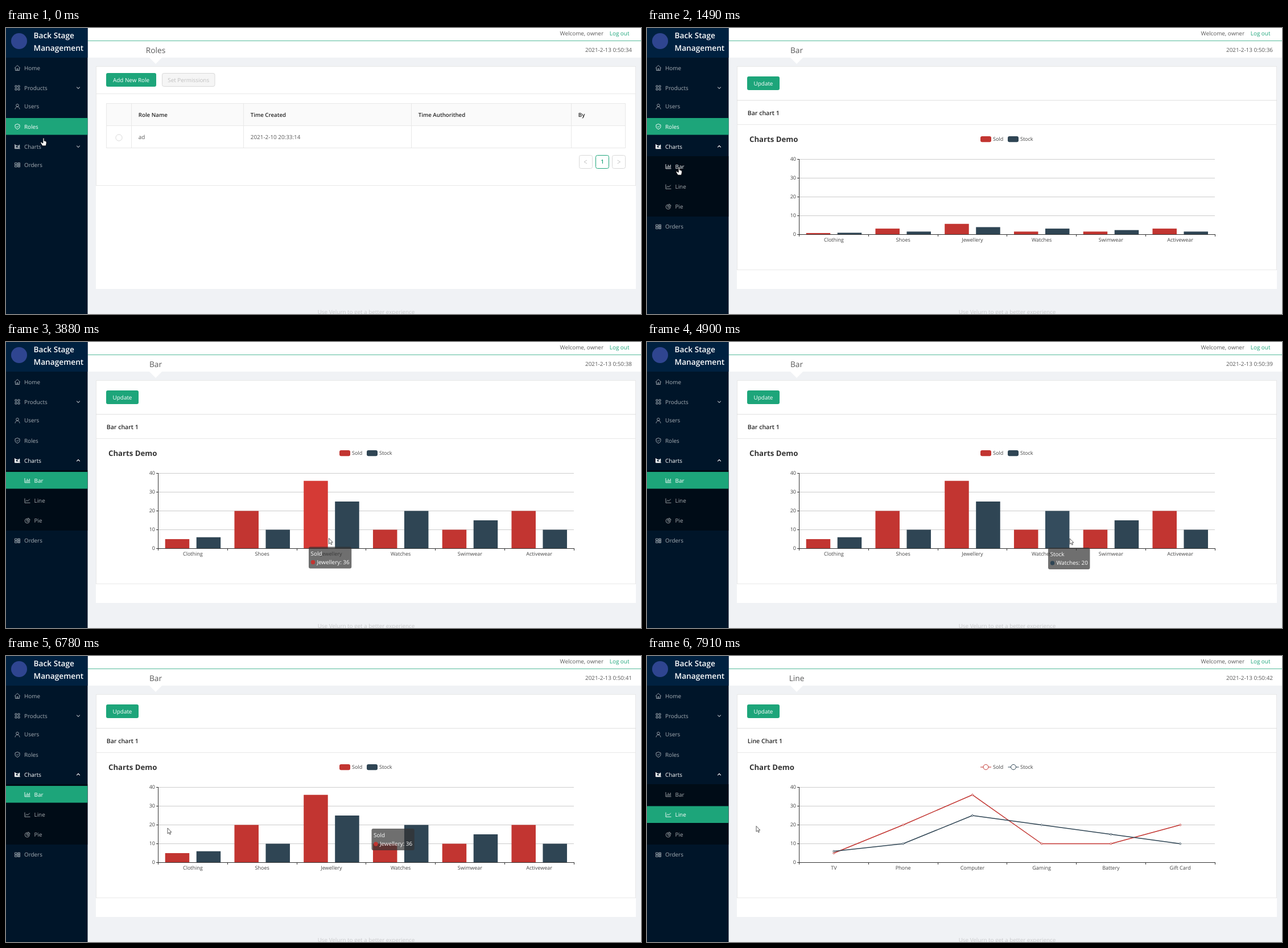
Animation of 1116x502 px, one loop 8 s. Source, as an HTML page:

```html
<!DOCTYPE html>
<html lang="en">
<head>
<meta charset="utf-8">
<title>Back Stage Management</title>
<style>
  html, body { margin: 0; width: 100%; height: 100%; overflow: hidden; background: #f0f2f5; }
  svg { display: block; width: 100%; height: 100%; font-family: "Open Sans", "Noto Sans", sans-serif; text-rendering: geometricPrecision; }
</style>
</head>
<body>
<svg id="stage" viewBox="0 0 1116 502"></svg>
<script>
const LOOP = 8000, TICK = 125, LAST = 63;
const GREEN = '#1da57a', BORDER = '#e8e8e8', BODY = '#595959', HEAD = '#262626';
const COLORS = ['#c23531', '#2f4554'], LIT = ['#d53a35', '#344c5d'];
const SERIES = ['Sold', 'Stock'];
const VALUES = [[5, 20, 36, 10, 10, 20], [6, 10, 25, 20, 15, 10]];
const BAR_CATS = ['Clothing', 'Shoes', 'Jewellery', 'Watches', 'Swimwear', 'Activewear'];
const LINE_CATS = ['TV', 'Phone', 'Computer', 'Gaming', 'Battery', 'Gift Card'];
const BAR_PAGE = 12, LINE_PAGE = 60;

// tick, x, y of the pointer
const POINTER = [
  [0, 66, 193], [2, 66, 194], [7, 58, 235], [10, 56, 244], [17, 57, 245], [18, 60, 247],
  [20, 356, 266], [23, 430, 314], [25, 470, 298], [26, 600, 297], [28, 520, 342], [29, 474, 345],
  [31, 567.5, 344.5], [34, 604, 346], [35, 650, 346], [39, 743, 345], [40, 772, 346],
  [42, 835, 347], [44, 856, 347], [46, 910, 346], [50, 955, 346], [52, 710, 336],
  [53, 548, 325], [54, 284, 302], [57, 80, 287], [59, 57, 280], [60, 57, 280], [63, 192, 298.5]
];
// tick, x, y of the tooltip, which trails behind the pointer
const TIP = [
  [26, 615, 313], [28, 540, 350], [29, 485, 359], [31, 532, 359.5], [34, 612, 361],
  [37, 672, 361], [39, 705, 361], [40, 752, 361], [44, 862, 361], [49, 967, 360],
  [52, 967, 360], [53, 933, 358], [54, 642.5, 303]
];
// tick, series, category, bar lit
const HOVER = [
  [26, 1, 2, 1], [28, 0, 2, 1], [29, 1, 1, 1], [30, 0, 2, 1], [32, 1, 2, 1], [35, 0, 3, 1],
  [38, 1, 3, 1], [40, 0, 4, 1], [42, 1, 4, 1], [45, 0, 5, 1], [47, 1, 5, 1], [51, 1, 5, 0],
  [53, 0, 2, 1], [54, 0, 2, 0]
];
const CLOCK = [4, 12, 20, 28, 36, 44, 52, 60];

const clamp = v => Math.max(0, Math.min(1, v));
const easeOut = p => 1 - (1 - clamp(p)) ** 3;

function along(keys, k) {
  let i = 0;
  while (i < keys.length - 2 && keys[i + 1][0] <= k) i++;
  const [a, ax, ay] = keys[i], [b, bx, by] = keys[i + 1];
  const p = clamp((k - a) / (b - a));
  return [ax + (bx - ax) * p, ay + (by - ay) * p];
}

const rect = (x, y, w, h, fill, extra = '') =>
  `<rect x="${x}" y="${y}" width="${w}" height="${h}" fill="${fill}" ${extra}/>`;
const box = (x, y, w, h, stroke, fill = 'none', r = 0) =>
  rect(x + .5, y + .5, w - 1, h - 1, fill, `stroke="${stroke}" rx="${r}"`);
const path = (d, stroke, width = 1, fill = 'none', extra = '') =>
  `<path d="${d}" stroke="${stroke}" stroke-width="${width}" fill="${fill}" ${extra}/>`;
const circle = (x, y, r, fill, extra = '') => `<circle cx="${x}" cy="${y}" r="${r}" fill="${fill}" ${extra}/>`;
const text = (x, y, s, fill = BODY, size = 9.9, weight = 400, anchor = 'start') =>
  `<text x="${x}" y="${y}" fill="${fill}" font-size="${size}" font-weight="${weight}" text-anchor="${anchor}">${s}</text>`;

const pen = document.createElement('canvas').getContext('2d');
function textWidth(s) {
  pen.font = '9.9px "Open Sans", "Noto Sans", sans-serif';
  return pen.measureText(s).width;
}

// menu icons, drawn around 0,0
const ICONS = {
  Home: 'M-5 .5 0-4.5 5 .5M-3.5-.5V4.5H3.5V-.5M-1 4.5V1.5H1V4.5',
  Products: 'M-4-4h3v3h-3zM1-4h3v3h-3zM-4 1h3v3h-3zM1 1h3v3h-3z',
  Users: 'M-2.3-2a2.3 2.3 0 1 0 4.6 0a2.3 2.3 0 1 0-4.6 0M-4 4.7Q-3.6.6 0 .6T4 4.7',
  Roles: 'M0-4.5 4-3V1Q3.5 3.2 0 4.7Q-3.5 3.2-4 1V-3ZM-2-.2-.4 1.4 2.2-1.4',
  Charts: 'M-4.5-4V3.8H5M-3 2V0L-.8-2 .8-.5 3.8-3V2Z',
  Bar: 'M-4.5-4V3.8H5M-2.3 2.5V0M-.2 2.5V-2.8M1.8 2.5V-1M3.8 2.5V-3',
  Line: 'M-4.5-4V3.8H5M-3 1.5-.8-1 .8.8 4.2-2.8',
  Pie: 'M-.8-3.7A4 4 0 1 0 3.7 1H-.8ZM1-4.6A4 4 0 0 1 4.6-1H1Z',
  Orders: 'M-4.5-3.5h3.8v3h-3.8zM-4.5 .8h3.8v3h-3.8zM.8-3.5h3.7v7.3H.8zM.8 .2h3.7M2.6-3.5v7.3'
};

function menuItem(name, y, bright, { indent = 0, selected = 0 } = {}) {
  const ink = .65 + .35 * Math.max(bright, selected);
  const fillIcon = name === 'Charts' ? '#fff' : 'none';
  return (selected ? rect(0, y - 15, 143.5, 29.5, GREEN, `fill-opacity="${selected}"`) : '') +
    `<g opacity="${ink}"><g transform="translate(${20 + indent} ${y})">${path(ICONS[name], '#fff', .9, fillIcon)}</g>` +
    text(32 + indent, y + 3.6, name, '#fff') + '</g>';
}

function chevron(y, flip, bright) {
  const d = 2.8 * (1 - 2 * flip);
  return path(`M124.2 ${y - d / 2}l2.8 ${d} 2.8 ${-d}`, '#fff', 1.1, 'none', `opacity="${.65 + .35 * bright}"`);
}

function sidebar(k) {
  const open = easeOut((k - 1.7) / 3.3);
  const fade = start => easeOut((k - start) / 3);
  const toBar = fade(BAR_PAGE), toLine = fade(LINE_PAGE);
  const inCharts = k >= 1 ? 1 : 0;
  const sub = (name, y, bright, selected) => menuItem(name, y, bright, { indent: 17.5, selected });
  return rect(0, 0, 143.5, 502, '#001529') + rect(0, 0, 143.5, 52, '#002140') +
    circle(23, 23, 14, '#2f4590') +
    text(48.5, 18, 'Back Stage', '#fff', 13.7, 600) +
    text(48.5, 39.5, 'Management', '#fff', 13.7, 600) +
    menuItem('Home', 70, 0) + menuItem('Products', 105, 0) + chevron(105, 0, 0) +
    menuItem('Users', 137.8, 0) + menuItem('Roles', 173, 0, { selected: 1 - toBar }) +
    menuItem('Charts', 208, inCharts) + chevron(208, open, inCharts) +
    `<clipPath id="fold">${rect(0, 225, 143.5, 106 * open, '#000')}</clipPath><g clip-path="url(#fold)">` +
    rect(0, 225, 143.5, 106, '#000c17') +
    sub('Bar', 243, k >= 9 && k < 18 ? 1 : 0, toBar * (1 - toLine)) +
    sub('Line', 278.5, k >= 58 ? 1 : 0, toLine) + sub('Pie', 313.7, 0, 0) + '</g>' +
    menuItem('Orders', 240.2 + 108.5 * open, 0);
}

function header(k, title) {
  const sec = 34 + CLOCK.filter(c => k >= c).length;
  return rect(143.5, 0, 972.5, 52, '#fff') + rect(143.5, 22, 972.5, 1, GREEN, 'opacity=".75"') +
    text(973.5, 13, 'Welcome, owner') + text(1060.8, 13, 'Log out', GREEN) +
    text(263, 44, title, BODY, 13.7, 400, 'middle') +
    text(1018, 41.5, `2021-2-13 0:50:${sec}`) +
    rect(158, 67, 949, 391, '#fff') +
    path('M252 52H274L263 63Z', 'none', 0, '#fff') +
    text(633, 501.7, 'Use Velurn to get a better experience', '#c9cacc', 9.9, 400, 'middle');
}

const button = (x, y, w, label) =>
  rect(x, y, w, 24, GREEN, 'rx="3"') + text(x + w / 2, y + 15.6, label, '#fff', 9.9, 400, 'middle');

function rolesPage() {
  const cols = [[220, 'Role Name', 'ad'], [417, 'Time Created', '2021-2-10 20:33:14'],
    [712, 'Time Authorithed', ''], [993, 'By', '']];
  let s = box(158, 67, 949, 210, BORDER) + rect(158, 115, 949, 1, BORDER) +
    button(176, 79, 88, 'Add New Role') + box(274, 79, 93.5, 24, '#d9d9d9', '#f5f5f5', 3) +
    text(320.7, 94.6, 'Set Permissions', '#bfbfbf', 9.9, 400, 'middle') +
    rect(176, 132, 913, 40, '#fafafa') + box(176, 132, 913, 79, BORDER) +
    rect(176, 171, 913, 1, BORDER) + circle(198.5, 192.5, 5.6, '#fff', 'stroke="#d9d9d9"');
  for (const [x, name, value] of cols)
    s += rect(x, 132, 1, 79, BORDER) + text(x + 12.8, 156, name, HEAD, 9.7, 600) + text(x + 12.8, 195.2, value);
  return s + box(1007, 223, 24, 24, '#d9d9d9', '#fff', 3) + box(1036, 223, 24, 24, GREEN, '#fff', 3) +
    box(1065, 223, 24, 24, '#d9d9d9', '#fff', 3) + text(1048, 238.4, '1', GREEN, 9.9, 600, 'middle') +
    path('M1021 232l-5 3 5 3M1074.5 232l5 3-5 3', '#bfbfbf', .9);
}

const X0 = 267.5, STEP = 121.75, Y0 = 362.5, UNIT = 3.3;

function chartFrame(cardTitle, chartTitle, cats) {
  let s = box(158, 67, 949, 358, BORDER) + rect(158, 126.5, 949, 1, '#dedede') + rect(158, 169, 949, 1, BORDER) +
    button(176, 85, 57, 'Update') + text(176.7, 153, cardTitle, HEAD, 10.6, 600) +
    text(180, 200, chartTitle, '#333', 13.2, 700) +
    text(608, 198, SERIES[0], '#444', 9) + text(656, 198, SERIES[1], '#444', 9);
  for (let i = 0; i <= 4; i++) {
    const y = 362 - 33 * i;
    if (i) s += rect(268, y, 730, 1, '#ccc');
    s += rect(264, y, 4, 1, '#333') + text(262, y + 3.3, i * 10, '#444', 9, 400, 'end');
  }
  s += rect(267, 230, 1, 133, '#333') + rect(267, 362, 731.5, 1, '#333');
  for (let i = 0; i <= 6; i++) s += rect(Math.floor(X0 + STEP * i), 362, 1, 4, '#333');
  cats.forEach((c, i) => s += text(X0 + STEP * (i + .5), 374.7, c, '#444', 9, 400, 'middle'));
  return s;
}

function tooltip(k, series, cat) {
  const [x, y] = along(TIP, k);
  const label = `${BAR_CATS[cat]}: ${VALUES[series][cat]}`;
  return rect(x, y, textWidth(label) + 18, 38, '#323232', 'rx="3" fill-opacity=".7"') +
    text(x + 3.6, y + 15, SERIES[series], '#fff') + circle(x + 7.5, y + 27, 3.7, COLORS[series]) +
    text(x + 14.4, y + 30.3, label, '#fff');
}

function barPage(k) {
  const grow = easeOut((k * TICK - 1450) / 900);
  const hover = k < 55 ? HOVER.filter(h => h[0] <= k).pop() : null;
  let s = '';
  VALUES.forEach((row, n) => {
    s += rect(586 + 48 * n, 190, 19, 10.3, COLORS[n], 'rx="3"');
    row.forEach((v, i) => {
      const lit = hover && hover[3] && hover[1] === n && hover[2] === i;
      const h = v * UNIT * grow;
      s += rect(X0 + STEP * i + 12.2 + 55 * n, Y0 - h, 42.5, h, (lit ? LIT : COLORS)[n]);
    });
  });
  return chartFrame('Bar chart 1', 'Charts Demo', BAR_CATS) + s + rect(267, 362, 731.5, 1, '#333') +
    (hover ? tooltip(k, hover[1], hover[2]) : '');
}

function linePage(k) {
  const shown = 740 * easeOut((k - LINE_PAGE + .3) / 2.8);
  let s = '', legend = '';
  VALUES.forEach((row, n) => {
    const pts = row.map((v, i) => [X0 + STEP * (i + .5), Y0 - v * UNIT]);
    const stroke = `stroke="${COLORS[n]}"`;
    legend += path(`M${586 + 48.5 * n} 195h19`, COLORS[n], 1) + circle(595.5 + 48.5 * n, 195, 4.5, '#fff', stroke);
    s += path('M' + pts.join('L'), COLORS[n], 1.5, 'none', 'stroke-linejoin="bevel"');
    for (const [x, y] of pts) s += circle(x, y, 1.5, '#fff', stroke + ' stroke-width=".9"');
  });
  return chartFrame('Line Chart 1', 'Chart Demo', LINE_CATS) + legend +
    `<clipPath id="wipe">${rect(264, 220, shown, 150, '#000')}</clipPath><g clip-path="url(#wipe)">${s}</g>`;
}

function pointer(k) {
  const [x, y] = along(POINTER, k);
  const arrow = 'M0 0V9.8L2.3 7.8 3.9 11.2 5.4 10.5 3.9 7.2H6.8Z';
  const hand = 'M-1 1a1 1 0 0 1 2 0v4l1 .2 1 .3 1 .4q1 .4 1 1.4v2.5l-1 4h-6l-3-5q-.4-1.4.6-1.6t2.2 1.6L-1 9Z';
  const onMenu = x < 143;
  return `<g transform="translate(${x} ${y})">${path(onMenu ? hand : arrow, onMenu ? '#111' : '#333', .8, '#fff')}</g>`;
}

function scene(k) {
  const [title, page] = k < BAR_PAGE ? ['Roles', rolesPage] : k < LINE_PAGE ? ['Bar', barPage] : ['Line', linePage];
  return rect(0, 0, 1116, 502, '#f0f2f5') + header(k, title) + page(k) + sidebar(k) + pointer(k);
}

const stage = document.getElementById('stage');
const begin = performance.now();
let drawn = -1;

function draw(now) {
  const t = Math.max(0, now - begin) % LOOP;
  const k = Math.min(LAST, Math.floor((t + 15) / TICK));
  if (k !== drawn) {
    stage.innerHTML = scene(k);
    drawn = k;
  }
  requestAnimationFrame(draw);
}
draw(begin);
</script>
</body>
</html>
```
